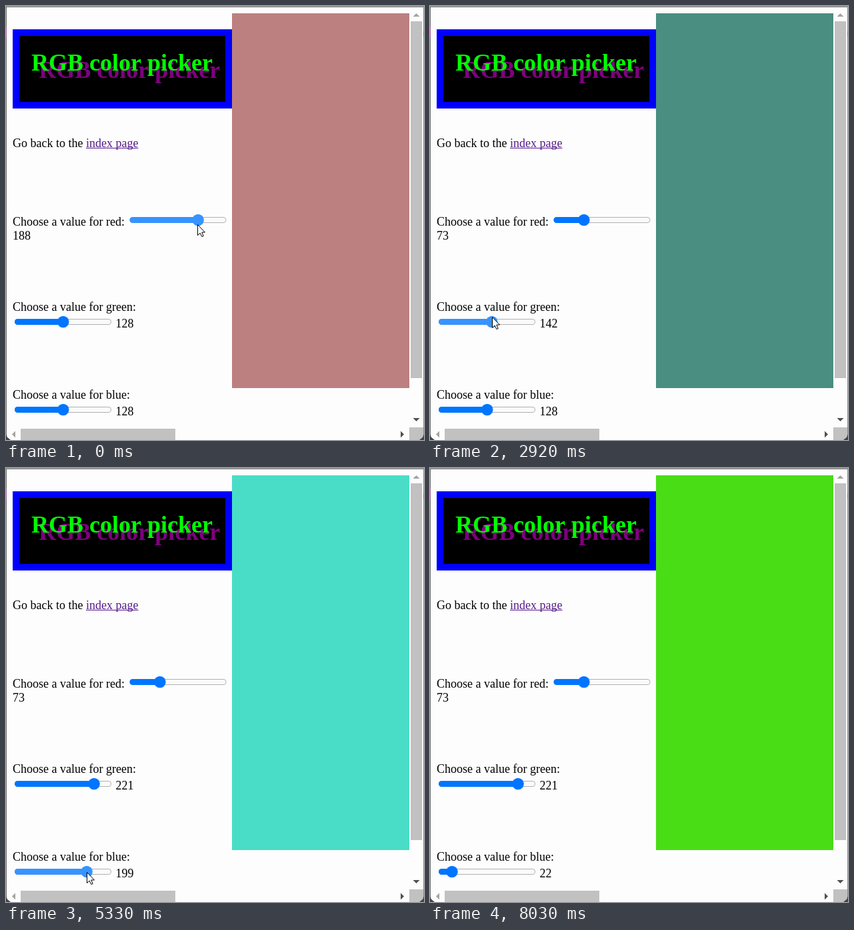
An HTML page with a canvas for the animation above (8050 ms loop, 627x652 px).

```html
<!DOCTYPE html>
<html lang="en">
<head>
<meta charset="utf-8">
<title>RGB color picker</title>
<style>
html, body { margin: 0; width: 100%; height: 100%; overflow: hidden; background: #fdfdfd; }
canvas { display: block; }
</style>
</head>
<body>
<canvas id="stage" width="627" height="652"></canvas>
<script>
const ctx = document.getElementById('stage').getContext('2d');
const LOOP = 8050, STEP = 140;
const SERIF = '"Liberation Serif", "Times New Roman", serif';
const RAIL = 145, RAIL_H = 9, KNOB = 9;

const sliders = {
  red: { x: 185.5, y: 321.5, start: 188 },
  green: { x: 13, y: 474.5, start: 128 },
  blue: { x: 13, y: 606.5, start: 128 }
};
const knobX = (s, value) => s.x + KNOB + value / 255 * (RAIL - 2 * KNOB);

// The user's session, one gesture after another, durations in ms
const script = [];
let clock = 0;
const add = (ms, gesture) => {
  script.push({ at: clock, ms, ...gesture });
  clock += ms;
};
const wait = ms => { clock += ms; };
const glide = (ms, x, y) => add(ms, { x, y });
const drag = (ms, name, value, y) =>
  add(ms, { name, value, x: knobX(sliders[name], value), y });

drag(710, 'red', 73, 328);
wait(140);
glide(580, 81, 480);
glide(390, 87, 472);
drag(140, 'green', 128, 470);
drag(550, 'green', 43, 468);
drag(410, 'green', 142, 467);
drag(427, 'green', 221, 468);
glide(783, 100, 644);
glide(540, 88, 607);
drag(270, 'blue', 128, 607);
drag(390, 'blue', 199, 607);
drag(150, 'blue', 225, 608);
drag(560, 'blue', 122, 602);
drag(620, 'blue', 22, 602);
wait(130);
glide(540, 795, 571);

// The screen refreshes in coarse steps, so every gesture does too
function progress(g, t) {
  const steps = Math.max(1, Math.round(g.ms / STEP));
  return Math.min(1, Math.floor((t - g.at) / g.ms * steps + 1e-6) / steps);
}

function poseAt(t) {
  const pose = { x: 287, y: 328, held: null };
  for (const name in sliders) pose[name] = sliders[name].start;
  for (const g of script) {
    if (t < g.at) break;
    const p = progress(g, t);
    const ease = key => { pose[key] += (g[key] - pose[key]) * p; };
    ease('x');
    ease('y');
    if (g.name) {
      pose.held = g.name;
      pose[g.name] += (g.value - pose[g.name]) * p;
    } else if (p > 0) pose.held = null;
  }
  for (const key of ['x', 'y', 'red', 'green', 'blue']) pose[key] = Math.round(pose[key]);
  return pose;
}

function rect(x, y, w, h, color) {
  ctx.fillStyle = color;
  ctx.fillRect(x, y, w, h);
}

function text(str, x, y, color = '#000', font = '18px ') {
  ctx.font = font + SERIF;
  ctx.fillStyle = color;
  ctx.fillText(str, x, y);
}

function poly(points, color) {
  ctx.beginPath();
  points.forEach(([x, y]) => ctx.lineTo(x, y));
  ctx.closePath();
  ctx.fillStyle = color;
  ctx.fill();
}

function pill(x, y, w, h, color) {
  ctx.beginPath();
  ctx.roundRect(x, y, w, h, h / 2);
  ctx.fillStyle = color;
  ctx.fill();
}

function slider(name, pose) {
  const s = sliders[name], knob = knobX(s, pose[name]), top = s.y - RAIL_H / 2;
  const over = pose.x >= s.x && pose.x <= s.x + RAIL && Math.abs(pose.y - s.y) <= KNOB;
  const held = pose.held === name, hover = over && !pose.held;
  const accent = held ? '#3793ff' : hover ? '#005cc8' : '#0075ff';
  pill(s.x, top, RAIL, RAIL_H, '#b2b2b2');
  pill(s.x + 1, top + 1, RAIL - 2, RAIL_H - 2, hover ? '#e5e5e5' : '#fafafa');
  pill(s.x, top, knob - s.x, RAIL_H, accent);
  ctx.beginPath();
  ctx.arc(knob, s.y, KNOB - 0.25, 0, 7);
  ctx.fill();
}

function heading() {
  rect(10, 35, 329, 119, '#00f');
  rect(20, 45, 309, 99, '#000');
  const title = 'RGB color picker', font = 'bold 36px ';
  text(title, 49.25, 108.25, '#800080', font);
  text(title, 38, 97, '#0f0', font);
}

// Triangle with its tip at x, y, pointing along dx, dy
function tip(x, y, dx, dy, color) {
  const bx = x - dx * 5, by = y - dy * 5;
  poly([[x, y], [bx + dy * 5, by + dx * 5], [bx - dy * 5, by - dx * 5]], color);
}

function scrollbars(hot) {
  const gray = '#c1c1c1', off = '#a3a3a3', on = '#505050';
  rect(607, 23, 17, 536, gray);
  rect(22, 635, 232, 17, hot ? '#a8a8a8' : gray);
  rect(605, 633, 21, 19, gray);
  tip(615.5, 11, 0, -1, off);
  tip(615.5, 624, 0, 1, on);
  tip(9, 643.5, -1, 0, off);
  tip(597, 643.5, 1, 0, on);
}

function windowEdge() {
  rect(0, 0, 627, 1, '#a0a0a0');
  rect(0, 1, 627, 1, '#808080');
  rect(0, 1, 1, 651, '#6c6c6c');
  rect(626, 1, 1, 651, '#8c8c8c');
  rect(0, 31, 1, 16, '#b060a8');
  rect(626, 38, 1, 8, '#c040b0');
  poly([[0, 643], [2, 648], [7, 652], [0, 652]], '#444');
  poly([[627, 643], [625, 648], [620, 652], [627, 652]], '#444');
}

function arrow(x, y) {
  const shape = [[0, 0], [0, 16], [3.7, 12.6], [6.3, 18], [8.7, 17], [6.3, 11.5], [11, 11.5]];
  poly(shape.map(([a, b]) => [x + a + 0.5, y + b + 0.5]), '#fff');
  ctx.strokeStyle = '#000';
  ctx.lineWidth = 1;
  ctx.stroke();
}

function draw(t) {
  const pose = poseAt(t);
  rect(0, 0, 627, 652, '#fdfdfd');
  heading();
  rect(339, 11, 266, 563, `rgb(${pose.red},${pose.green},${pose.blue})`);

  text('Go back to the ', 10, 212);
  text('index page', 120, 212, '#551a8b');
  rect(120, 213, 78.5, 1, '#551a8b');

  text('Choose a value for red:', 10, 330);
  text(pose.red, 10, 351);
  text('Choose a value for green:', 10, 458);
  text(pose.green, 164.5, 483);
  text('Choose a value for blue:', 10, 590);
  text(pose.blue, 164.5, 615);
  for (const name in sliders) slider(name, pose);

  scrollbars(pose.y >= 635);
  windowEdge();
  arrow(pose.x, pose.y);
}

function tick() {
  draw(performance.now() % LOOP);
  requestAnimationFrame(tick);
}
tick();
</script>
</body>
</html>
```
